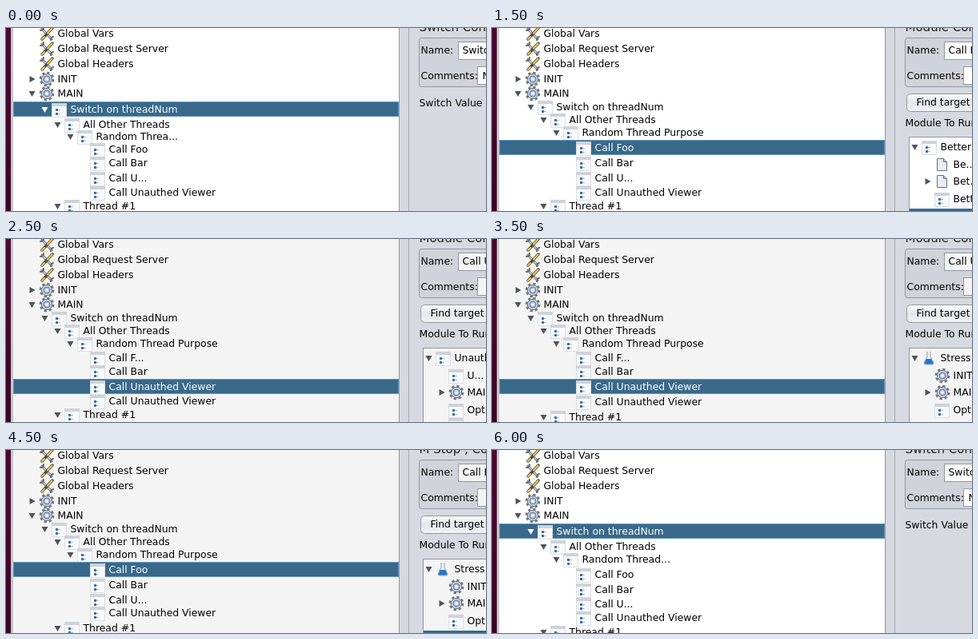
An HTML page that plays this animation: 600 px wide and 229 px high, repeating every 6500 ms.

```html
<!DOCTYPE html>
<html lang="en">
<head>
<meta charset="utf-8">
<title>Tree selection</title>
<style>
html, body { margin: 0; width: 100%; height: 100%; overflow: hidden; background: #d6d9df; }
svg { display: block; width: 600px; height: 229px; }
text { font: 12.4px "DejaVu Sans", sans-serif; white-space: pre; }
.title { font-size: 15px; fill: #222; }
.state { --paper: #fff; visibility: hidden; animation: show 6.5s step-end infinite; }
.dim { --paper: #f4f4f4; }
@keyframes show {
  0% { visibility: visible; }
  7.6923%, 100% { visibility: hidden; }
}
</style>
</head>
<body>
<svg id="stage" viewBox="0 0 600 229">
  <defs>
    <linearGradient id="wall" x2="0" y2="1">
      <stop stop-color="#4b0830"/><stop offset="1" stop-color="#3a0424"/>
    </linearGradient>
    <linearGradient id="btn" x2="0" y2="1">
      <stop stop-color="#fafbfc"/><stop offset=".5" stop-color="#e3e6eb"/><stop offset="1" stop-color="#f1f3f6"/>
    </linearGradient>
    <g id="box">
      <path d="M.5-7.5h18v17h-18z" fill="#f8f9fa" stroke="#dcdfe3"/>
      <path d="M0-8h19v4H0z" fill="#cfd3d8"/>
      <path d="M5-1h3v3H5zM5 4h3v3H5z" fill="#3d70a8"/>
      <path d="M8.500.5h2M8.500 5.500h2" stroke="#7fa0c4"/>
    </g>
    <g id="gear">
      <circle cx="10" r="8" fill="none" stroke="#70757d" stroke-width="2.600" stroke-dasharray="3.4 2.883"/>
      <circle cx="10" r="6.600" fill="#c9ced6" stroke="#70757d"/>
      <circle cx="10" r="4" fill="#a9c4e6" stroke="#5f7ea8"/>
      <circle cx="10" r="1.800" fill="#fff"/>
    </g>
    <g id="tools" fill="none" stroke-linecap="round">
      <path d="M4-6L16 7" stroke="#55585c" stroke-width="3"/>
      <path d="M4-6L16 7" stroke="#d5d8da" stroke-width="1.500"/>
      <path d="M2-4a3.500 3.500 0 0 0 4-4M15 8a3.500 3.500 0 0 1 3-4" stroke="#66696d" stroke-width="2"/>
      <path d="M17-7L4 7" stroke="#4c4a42" stroke-width="3.500"/>
      <path d="M16.500-6.500L11-.5M7 4L4 7" stroke="#f0c54a" stroke-width="2"/>
    </g>
    <g id="file">
      <path d="M3.5-7.5h8l4 4v11h-12z" fill="#e9eef5" stroke="#65707f"/>
      <path d="M11.5-7.5v4h4" fill="#b9c5d5" stroke="#65707f"/>
    </g>
    <g id="flask">
      <path d="M7-8v6L3 6q0 2 2 2h8q2 0 2-2L11-2v-6" fill="#edf4fb" stroke="#8a9cb0"/>
      <path d="M6 1L3.500 6q0 1.500 1.500 1.500h8q1.500 0 1.500-1.500L12 1z" fill="#2672c9"/>
    </g>
  </defs>
</svg>
<script>
const BLUE = '#39698a', GLOW = '#6496c0', PANEL = '#d6d9df', LINE = '#9297a1', PAPER = 'var(--paper)';

const rect = (x, y, w, h, fill, more = '') =>
  `<rect x="${x}" y="${y}" width="${w}" height="${h}" style="fill:${fill}" ${more}/>`;
const text = (x, y, s, more = '') => `<text x="${x + .5}" y="${y + 4}" ${more}>${s}</text>`;
const framed = (x, y, w, h, fill, r = 0, line = LINE) =>
  rect(x + .5, y + .5, w, h, fill, `stroke="${line}" rx="${r}"`);

function row(x, y, label, icon = 'box', toggle = '', selected = false) {
  const arrow = { open: 'm-4-3h8l-4 7z', shut: 'm-3-4l7 4-7 4z' }[toggle];
  return (selected ? framed(9, y - 10, 481, 18, BLUE, 0, GLOW) : '') +
    (arrow ? `<path d="M${x - 31.5} ${y}${arrow}" fill="${selected ? '#fff' : '#50545a'}"/>` : '') +
    `<use href="#${icon}" x="${x - 23}" y="${y}"/>` +
    text(x, y, label, `fill="${selected ? '#fff' : '#000'}"`);
}

// ys: centres of the eight changing rows; sel: index of the selected one
function leftTree({ ys, sel, names = {} }) {
  const labels = ['Switch on threadNum', 'All Other Threads', 'Random Thread Purpose',
    'Call Foo', 'Call Bar', 'Call U...', 'Call Unauthed Viewer', 'Thread #1'];
  const indent = [80, 96, 112, 128, 128, 128, 128, 96];
  return rect(0, 0, 6, 229, 'url(#wall)') + rect(6, 0, 3, 229, '#c3c6cd') +
    rect(9, 0, 482, 229, PAPER) + rect(491, 0, 1, 229, LINE) +
    rect(503, 0, 1, 229, '#a5a9b2') +
    ['Vars', 'Request Server', 'Headers'].map((s, i) => row(64, 7 + 19 * i, 'Global ' + s, 'tools')).join('') +
    row(64, 64, 'INIT', 'gear', 'shut') + row(64, 82, 'MAIN', 'gear', 'open') +
    ys.map((y, i) => row(indent[i], y, names[i] || labels[i], 'box',
      i < 3 || i === 7 ? 'open' : '', i === sel)).join('');
}

const form = (title, name, note = '') =>
  text(516, 0, title, 'class="title"') +
  framed(516, 12, 100, 61, '#d0d3da', 3) +
  text(518, 28, 'Name:') + framed(565, 17, 60, 22, PAPER) + text(570, 28, name) +
  text(518, 60, 'Comments:') + framed(589, 48, 40, 22, PAPER) + text(595, 60, note);

const targets = {
  better: [['Better', 'box', 'open'], ['Be...', 'file'], ['Bet...', 'file', 'shut'], ['Better', 'box']],
  viewer: [['Unauthed', 'box', 'open'], ['U...', 'box'], ['MAIN', 'gear', 'shut'], ['Options', 'box'], ['', 'box']],
  stress: [['Stress', 'flask', 'open'], ['INIT', 'gear'], ['MAIN', 'gear', 'shut'], ['Options', 'box']]
};

const panels = {
  switch: () => form('Switch Controller', 'Switch on', 'Note') + text(516, 94, 'Switch Value'),
  simple: () => form('Simple Controller', 'All Other'),
  random: () => form('Random Controller', 'Random') +
    framed(518, 82, 13, 13, 'url(#btn)', 3) + text(538, 89, 'Ignore sub-controller'),
  module: (name, tree, marked, title = 'Module Controller') => form(title, name) +
    framed(518, 82, 110, 22, 'url(#btn)', 5) + text(530, 93, 'Find target element') +
    text(516, 119, 'Module To Run') +
    framed(521, 136, 100, 110, PAPER) +
    (marked ? rect(522, 226, 78, 3, BLUE) : '') +
    targets[tree].map((r, i) => row(i ? 576 : 560, [149, 171, 192, 214, 232][i], ...r)).join('')
};

const cutFoo = { 3: 'Call F...' };
const cutRandom = { 2: 'Random Threa...' }, cutRandom2 = { 2: 'Random Thread...' };
const wide = { 3: 'Call F...', 5: 'Call Unauthed Viewer' };
const top3 = [99, 115, 131];

const states = [
  { sel: 0, ys: [102, 121, 136, 152, 169, 188, 206, 223], names: cutRandom, panel: ['switch'] },
  { sel: 1, ys: [98, 118, 137, 153, 169, 188, 206, 223], names: cutRandom, panel: ['simple'] },
  { sel: 2, ys: [98, 115, 134, 153, 169, 188, 206, 223], panel: ['random'] },
  { sel: 3, ys: [...top3, 150, 169, 188, 206, 223], panel: ['module', 'Call Foo', 'better', true] },
  { sel: 4, ys: [...top3, 149, 169, 188, 206, 223], names: cutFoo, panel: ['module', 'Call Bar', 'better', true] },
  { sel: 5, ys: [...top3, 149, 166, 185, 203, 220], names: wide, dim: true, panel: ['module', 'Call Unauthed', 'viewer'] },
  { sel: 6, ys: [...top3, 149, 166, 183, 204, 223], names: wide, dim: true, panel: ['module', 'Call Unauthed', 'stress'] },
  { sel: 5, ys: [...top3, 149, 166, 185, 204, 223], names: wide, dim: true, panel: ['module', 'Call Unauthed', 'stress'] },
  { sel: 4, ys: [...top3, 149, 169, 188, 204, 223], names: cutFoo, dim: true, panel: ['module', 'Call Bar', 'stress', true] },
  { sel: 3, ys: [...top3, 150, 169, 188, 204, 223], dim: true, panel: ['module', 'Call Foo', 'stress', true, 'M Stop , Controller'] },
  { sel: 2, ys: [98, 114, 134, 153, 172, 190, 207, 226], names: { 1: 'All Ot...' }, panel: ['random'] },
  { sel: 1, ys: [98, 118, 137, 156, 175, 193, 210, 228], names: cutRandom2, panel: ['simple'] },
  { sel: 0, ys: [102, 121, 137, 156, 175, 193, 210, 228], names: cutRandom2, panel: ['switch'] }
];

document.getElementById('stage').insertAdjacentHTML('beforeend', states.map((s, i) => {
  const [kind, ...args] = s.panel;
  return `<g class="state${s.dim ? ' dim' : ''}" style="animation-delay:${i * 500 - 6500}ms">` +
    rect(0, 0, 600, 229, PANEL) + leftTree(s) + panels[kind](...args) + '</g>';
}).join(''));
</script>
</body>
</html>
```
